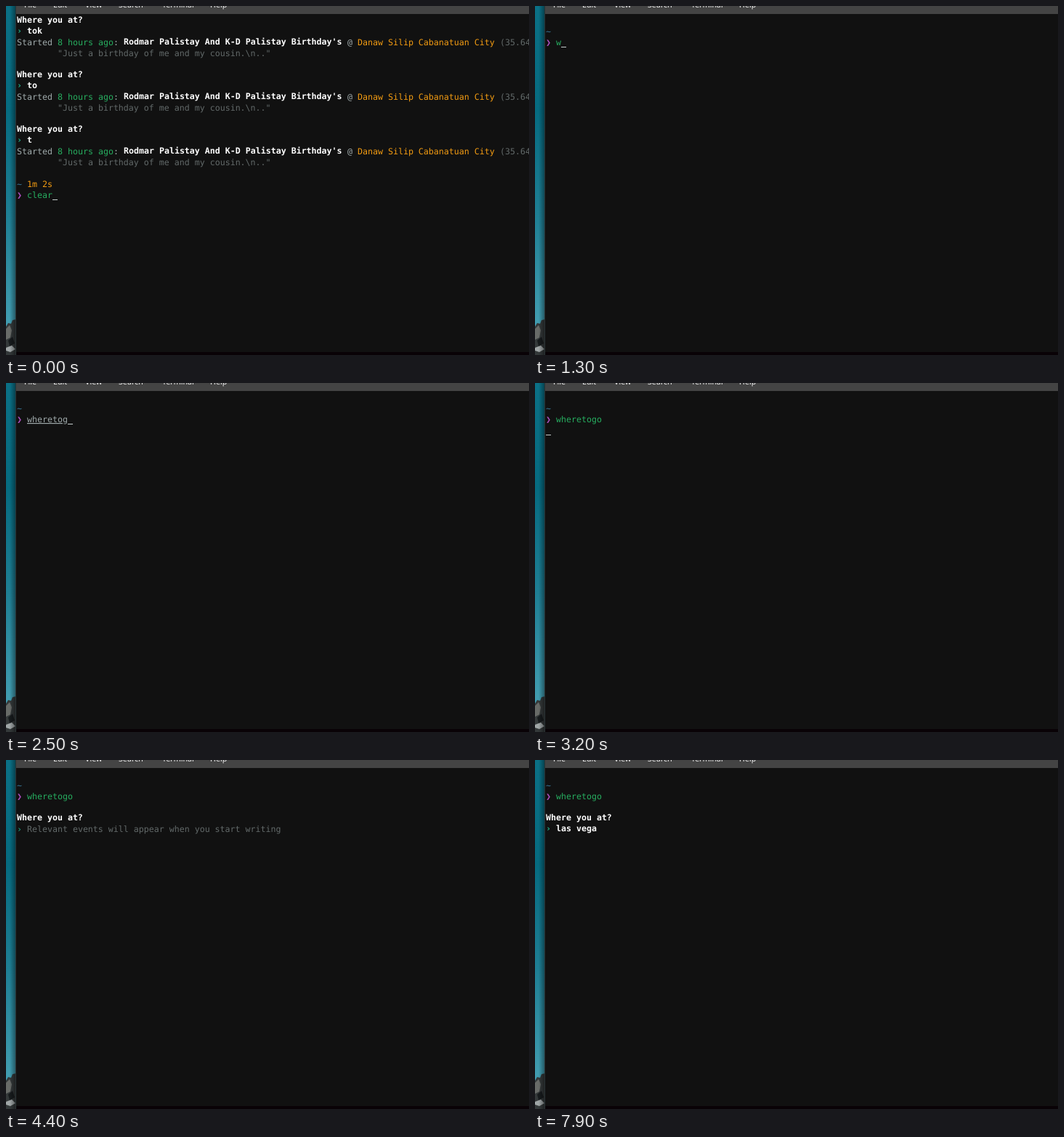
These frames come from a looping animation (720 by 480 pixels, 8000 ms). An HTML page:

```html
<!DOCTYPE html>
<html lang="en">
<head>
<meta charset="utf-8">
<style>
  html, body { margin: 0; width: 100%; height: 100%; overflow: hidden; background: #111; }
  svg { display: block; width: 720px; height: 480px; }
  text { white-space: pre; text-rendering: geometricPrecision; }
  #screen { font: 11.627px "DejaVu Sans Mono", monospace; }
  #menu { font: 10.7px "Noto Sans", sans-serif; fill: #f0f0f0; }
</style>
</head>
<body>
<svg viewBox="0 0 720 480">
  <defs>
    <linearGradient id="sea" x2="0" y2="1">
      <stop offset="0" stop-color="#0b7086"/>
      <stop offset=".3" stop-color="#066b81"/>
      <stop offset=".6" stop-color="#1f7f95"/>
      <stop offset=".9" stop-color="#419cb0"/>
    </linearGradient>
    <linearGradient id="shade">
      <stop offset="0" stop-color="#000" stop-opacity="0"/>
      <stop offset="1" stop-color="#000" stop-opacity=".45"/>
    </linearGradient>
  </defs>
  <rect width="14" height="480" fill="url(#sea)"/>
  <path d="M0 441L3 436L7 437L9 432L14 431V480H0Z" fill="#34393a"/>
  <path d="M0 444L5 439L8 446L6 456L0 459Z" fill="#686b68"/>
  <path d="M3 460L9 455L12 464L5 468Z" fill="#171b1d"/>
  <path d="M0 470L8 467L13 472L6 476L0 474Z" fill="#a0a6a7"/>
  <rect x="5" width="9" height="480" fill="url(#shade)"/>
  <rect x="13" width="1" height="480" fill="#2b3436"/>
  <rect x="14" width="706" height="480" fill="#111"/>
  <rect x="14" width="706" height="11" fill="#444"/>
  <rect x="14" y="476" width="706" height="4" fill="#090206"/>
  <g id="menu">
    <text x="25" y="2">File</text><text x="65" y="2">Edit</text>
    <text x="109" y="2">View</text><text x="155" y="2">Search</text>
    <text x="215" y="2">Terminal</text><text x="281" y="2">Help</text>
  </g>
  <g id="screen"></g>
</svg>
<script>
const LOOP = 8000;
const C = {
  white: '#fff', fg: '#a0abac', dim: '#626969', green: '#27ae60',
  orange: '#f39c12', magenta: '#b04fc4', blue: '#397a9c', teal: '#20b08a'
};
const screen = document.getElementById('screen');

// Key times for the shell command and for the search field
const command = [1300, 1500, 1600, 1800, 1900, 2000, 2200, 2500, 2600];
const query = [6500, 6700, 6900, 7100, 7200, 7500, 7600, 7800];
const typed = (str, keys, t) => str.slice(0, keys.filter(k => k <= t).length);

const colX = col => 15 + 7 * col;
const rowY = row => 24 + 15 * row;

function put(row, col, str, color, extra = '') {
  return `<text x="${colX(col)}" y="${rowY(row)}" fill="${color}" ${extra}>${str}</text>`;
}
function bold(row, col, str, color = C.white) {
  return `<text x="${colX(col)}" y="${rowY(row) - 1}" fill="${color}" font-weight="700">${str}</text>`;
}
function cursor(row, col) {
  return `<rect x="${colX(col)}" y="${rowY(row) + 2}" width="7" height="1" fill="#c4cccc"/>`;
}
function line(row, ...parts) {
  let col = 0, out = '';
  for (const [str, color, draw = put] of parts) {
    out += draw(row, col, str, color);
    col += str.length;
  }
  return out;
}
function ask(row, str) {
  return bold(row, 0, 'Where you at?') + bold(row + 1, 0, '›', C.teal) + bold(row + 1, 2, str);
}
function result(row) {
  return line(row,
    ['Started ', C.fg], ['8 hours ago', C.green], [': ', C.fg],
    ["Rodmar Palistay And K-D Palistay Birthday's", C.white, bold],
    [' @ ', C.fg], ['Danaw Silip Cabanatuan City', C.orange], [' (35.64', C.dim]
  ) + put(row + 1, 8, '"Just a birthday of me and my cousin.\\n.."', C.dim);
}
function prompt(row, str, color, extra) {
  return put(row, 0, '~', C.blue) + put(row + 1, 0, '❯', C.magenta) + put(row + 1, 2, str, color, extra);
}

function history() {
  return ['tok', 'to', 't'].map((q, i) => ask(i * 5, q) + result(i * 5 + 2)).join('') +
    prompt(15, 'clear', C.green) + put(15, 2, '1m 2s', C.orange) + cursor(16, 7);
}

function shell(t) {
  const cmd = typed('wheretogo', command, t);
  const known = ['w', 'where', 'wheretogo'].includes(cmd);
  let out = prompt(1, cmd, known ? C.green : C.fg, known ? '' : 'text-decoration="underline"');
  if (t < 2900) out += cursor(2, 2 + cmd.length);
  else if (t < 3400) out += cursor(3, 0);
  if (t >= 6500) out += ask(4, typed('las vega', query, t));
  else if (t >= 4000) {
    out += bold(4, 0, 'Where you at?') + put(5, 0, '›', C.teal) +
      put(5, 2, 'Relevant events will appear when you start writing', C.dim);
  }
  return out;
}

let shown = '';
function render(t) {
  const next = t < 100 ? history() : shell(t);
  if (next !== shown) screen.innerHTML = shown = next;
}

const start = performance.now();
function tick() {
  render((performance.now() - start) % LOOP);
  requestAnimationFrame(tick);
}
tick();
</script>
</body>
</html>
```
